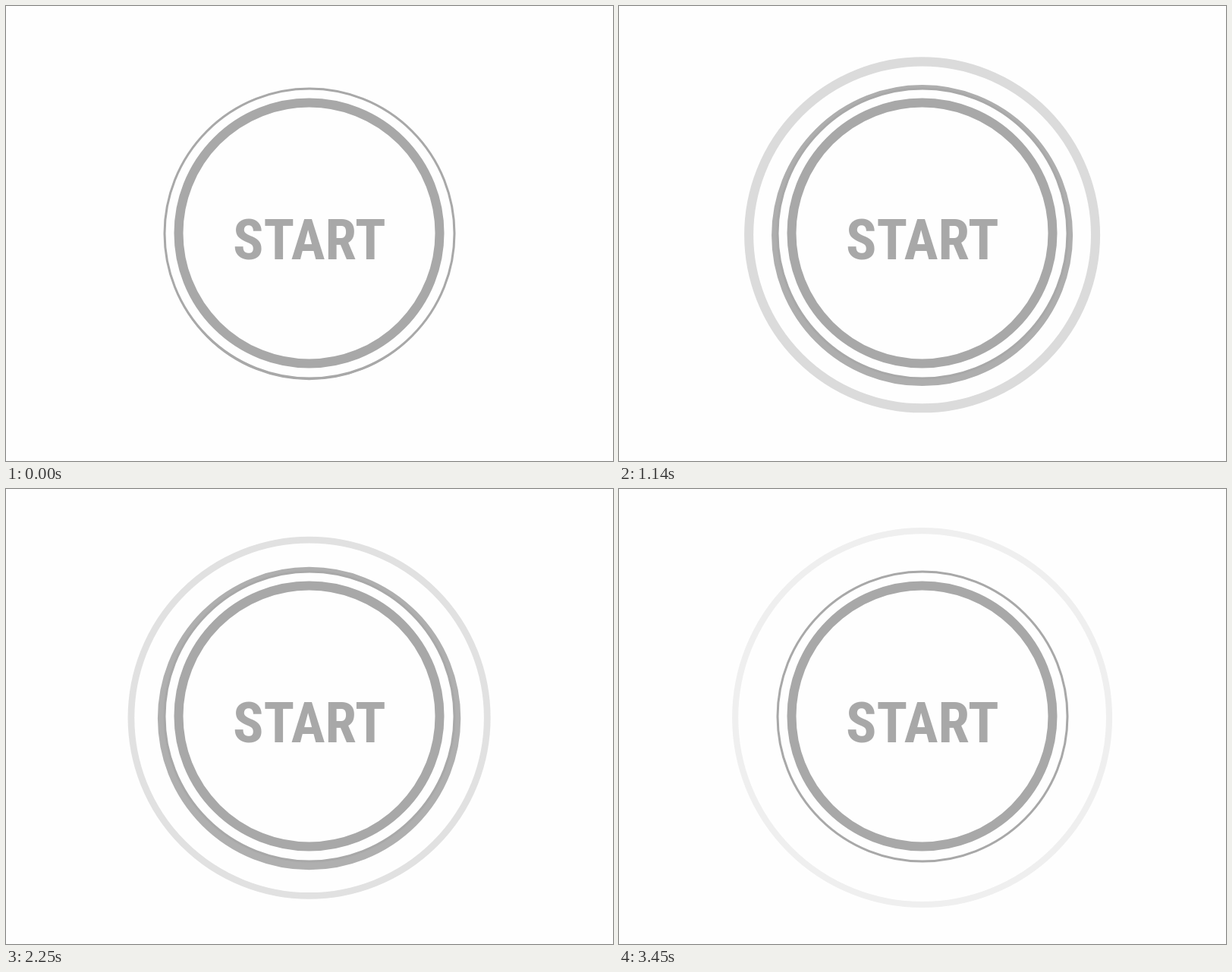
Write an HTML page with a canvas that moves like this. It is 800x600 px and loops after 4320 ms.

```html
<!DOCTYPE html>
<html lang="en">
<head>
<meta charset="utf-8">
<title>Start button</title>
<style>
  html, body { margin: 0; width: 100%; height: 100%; overflow: hidden; background: #fefefe; }
  canvas { display: block; }
</style>
</head>
<body>
<canvas id="stage" width="800" height="600" role="img" aria-label="START"></canvas>
<script>
const ctx = document.getElementById('stage').getContext('2d');
const LOOP = 4320;
const STEP = 30;
const PAPER = '#fefefe';
const GREY = '#a8a8a8';

// Each wave: [time, outer radius] keys, and how fast its band thins as it grows.
const waves = [
  { thinning: 0.27, keys: [[0, 190.5], [570, 212.5], [1140, 234.5], [1880, 263]] },
  { thinning: 0.35, keys: [[960, 192], [1140, 198.5], [1920, 227.5], [2550, 249.5], [2940, 263]] },
  { thinning: 0.26, keys: [[2070, 192], [2550, 212.5], [2970, 230.5], [3450, 250.5], [LOOP, 250.5]] }
];

function radiusAt(keys, time) {
  for (let i = 1; i < keys.length; i++) {
    const [t0, r0] = keys[i - 1];
    const [t1, r1] = keys[i];
    if (time >= t0 && time < t1) return r0 + (r1 - r0) * (time - t0) / (t1 - t0);
  }
  return 0;
}

function disc(x, y, radius, color) {
  ctx.fillStyle = color;
  ctx.beginPath();
  ctx.arc(x, y, radius, 0, Math.PI * 2);
  ctx.fill();
}

function ring(x, y, outer, width, color) {
  ctx.strokeStyle = color;
  ctx.lineWidth = width;
  ctx.beginPath();
  ctx.arc(x, y, outer - width / 2, 0, Math.PI * 2);
  ctx.stroke();
}

function drawWave({ keys, thinning }, time) {
  const outer = radiusAt(keys, time);
  const width = 18 - thinning * (outer - 212.5);
  if (!outer || width <= 0) return;
  const shade = Math.min(254, Math.max(168, Math.round(174 + (outer - 198.5) * 1.255)));
  const y = 302.3 - 0.02 * (outer - 212.5);
  ring(399.6, y, outer, width, `rgb(${shade}, ${shade}, ${shade})`);
}

const setFont = size => {
  ctx.font = `600 condensed ${size}px "Roboto Condensed", Roboto, sans-serif`;
};

function drawLabel(text, x, y, maxSize, maxWidth) {
  const inkWidth = m => m.actualBoundingBoxLeft + m.actualBoundingBoxRight;
  ctx.textAlign = 'left';
  setFont(maxSize);
  setFont(maxSize * Math.min(1, maxWidth / inkWidth(ctx.measureText(text))));
  const m = ctx.measureText(text);
  ctx.fillStyle = GREY;
  ctx.fillText(text,
    x - inkWidth(m) / 2 + m.actualBoundingBoxLeft,
    y + (m.actualBoundingBoxAscent - m.actualBoundingBoxDescent) / 2);
}

function draw(time) {
  ctx.fillStyle = PAPER;
  ctx.fillRect(0, 0, 800, 600);
  for (const wave of waves) drawWave(wave, time);
  disc(400, 300, 191, PAPER);
  ring(400, 300, 192.5, 3, GREY);
  ring(399.5, 299.5, 178, 12, GREY);
  drawLabel('START', 400, 307, 79, 198);
}

const start = performance.now();
function tick() {
  const elapsed = (performance.now() - start) % LOOP;
  draw(Math.floor(elapsed / STEP) * STEP);
  requestAnimationFrame(tick);
}
tick();
</script>
</body>
</html>
```
